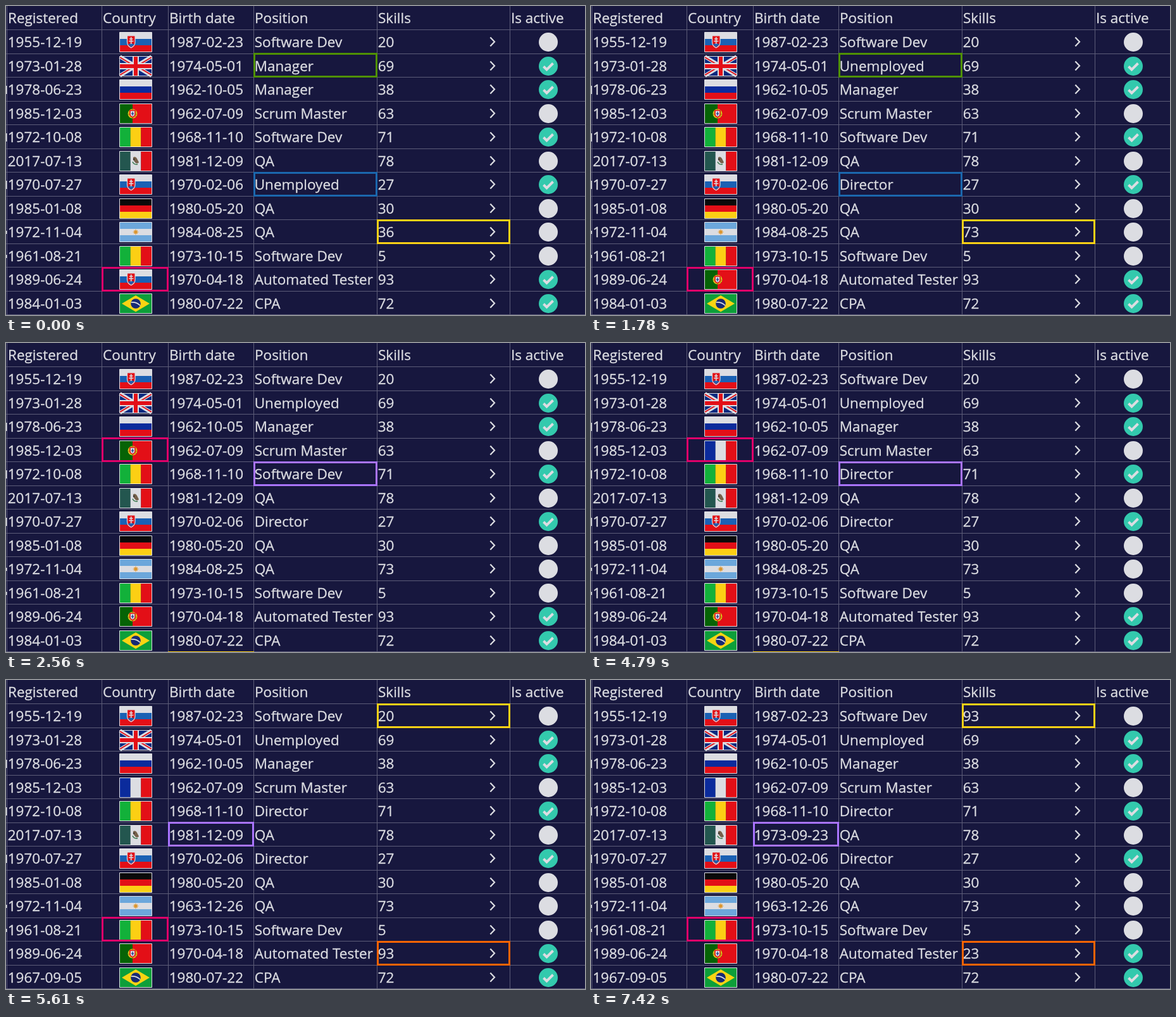
Write an HTML page that moves like this. It is 915 px wide and 488 px high and loops after 8000 ms.

```html
<!DOCTYPE html>
<html lang="en">
<head>
<meta charset="utf-8">
<title>Live data grid</title>
<style>
html, body { margin: 0; height: 100%; overflow: hidden; background: #17173e; }
svg { display: block; width: 915px; height: 488px; font: 22.5px "Open Sans", "Noto Sans", sans-serif; }
text { fill: #dcdde2; stroke: #dcdde2; stroke-width: .3px; white-space: pre; }
</style>
</head>
<body>
<svg id="grid" viewBox="0 0 915 488"></svg>
<script>
const LOOP = 8000, ROW = 37.5, LIGHT = '#dcdde2';
const cols = [1, 151, 256, 391, 586, 796, 915];
const heads = ['Registered', 'Country', 'Birth date', 'Position', 'Skills', 'Is active'];
const steps = [0, 610, 2560, 3570, 5610, 6540];

const rows = `1955-12-19|sk|1987-02-23|Software Dev|20|
1973-01-28|gb|1974-05-01|Manager|69|y
1978-06-23|ru|1962-10-05|Manager|38|y
1985-12-03|pt|1962-07-09|Scrum Master|63|
1972-10-08|ml|1968-11-10|Software Dev|71|y
2017-07-13|mx|1981-12-09|QA|78|
1970-07-27|sk|1970-02-06|Unemployed|27|y
1985-01-08|de|1980-05-20|QA|30|
1972-11-04|ar|1984-08-25|QA|36|
1961-08-21|ml|1973-10-15|Software Dev|5|
1989-06-24|sk|1970-04-18|Automated Tester|93|y
1984-01-03|br|1980-07-22|CPA|72|y`.split('\n').map(r => r.split('|'));

// step, row, column, new value
const edits = [
  [1, 2, 3, 'Unemployed'], [1, 7, 3, 'Director'], [1, 9, 4, '73'], [1, 11, 1, 'pt'],
  [3, 4, 1, 'fr'], [3, 5, 3, 'Director'],
  [4, 9, 2, '1963-12-26'], [4, 12, 0, '1967-09-05'],
  [5, 1, 4, '93'], [5, 6, 2, '1973-09-23'], [5, 11, 4, '23']
];

// first step, last step, row, column, colour
const marks = [
  [0, 1, 2, 3, '#4f9100'], [0, 1, 7, 3, '#1b67ad'], [0, 1, 9, 4, '#fcd116'], [0, 1, 11, 1, '#df0069'],
  [2, 3, 4, 1, '#df0069'], [2, 3, 5, 3, '#a974ff'], [2, 3, 13, 2, '#fcd116'],
  [4, 5, 1, 4, '#fcd116'], [4, 5, 6, 2, '#a974ff'], [4, 5, 10, 1, '#df0069'], [4, 5, 11, 4, '#ff6400']
];

const rect = (x, y, w, h, fill) => `<rect x="${x}" y="${y}" width="${w}" height="${h}" fill="${fill}"/>`;
const path = (d, fill, stroke = 'none', w = 1) =>
  `<path d="${d}" fill="${fill}" stroke="${stroke}" stroke-width="${w}"/>`;
const dot = (x, y, r, fill) => `<circle cx="${x}" cy="${y}" r="${r}" fill="${fill}"/>`;
const text = (x, y, s) => `<text x="${x}" y="${y}">${s}</text>`;
const bands = (...c) => c.map((f, i) => rect(1, 1 + i * 10, 50, 10, f)).join('');
const bars = (...c) => c.map((f, i) => rect(1 + i * 50 / 3, 1, 50 / 3 + .1, 30, f)).join('');

const red = '#e30f17', yellow = '#fccf14';
const flags = {
  sk: bands(LIGHT, '#1a61b4', red) +
    path('M12.5 6H25V16Q25 22 18.7 25Q12.5 22 12.5 16Z', red, LIGHT, 1.2) +
    path('M14 20Q16 17 18.7 19Q21.5 17 23.5 20L18.7 24Z', '#1a61b4') +
    path('M18.7 8V19M16 11H21.5M15 14.5H22.5', 'none', LIGHT, 1.6),
  gb: rect(0, 0, 52, 32, '#0b2a80') +
    path('M1 1L51 31M51 1L1 31', 'none', LIGHT, 6) +
    path('M1 2L26 17M26 15L51 30M51 2L26 17M26 15L1 30', 'none', red, 2) +
    path('M26 1V31M1 16H51', 'none', LIGHT, 10) +
    path('M26 1V31M1 16H51', 'none', red, 6),
  ru: bands(LIGHT, '#0b2b9c', red),
  pt: rect(0, 0, 21, 32, '#066306') + rect(21, 0, 31, 32, red) +
    dot(21, 16, 7.5, '#d9bd1c') + path('M15 11L27 21M14 17H28M21 8V24', 'none', '#8c6a10', .8) +
    path('M17 11H25V17Q25 20 21 21.5Q17 20 17 17Z', LIGHT, red, 1.6) +
    path('M21 13V19M19 16H23', 'none', '#24428f', 1.3),
  ml: bars('#12b13a', yellow, red),
  mx: bars('#23564f', LIGHT, red) +
    path('M22 10Q26 8 28 12L31 18Q28 21 25 18L22 14Z', '#75604a') +
    path('M21 17Q23 22 29 21', 'none', '#3d7a50', 1.5) + dot(23, 13, 1.2, '#33302f'),
  de: bands('#0a0a0a', red, yellow),
  ar: bands('#6ca7db', LIGHT, '#6ca7db') +
    path('M21.5 16H30.5M26 11.5V20.5M23 13L29 19M29 13L23 19', 'none', '#e3a13c', 1) +
    dot(26, 16, 2.7, '#dc962f'),
  br: rect(0, 0, 52, 32, '#0d9f3a') + path('M4 16L26 3L48 16L26 29Z', '#f8d413') +
    dot(26, 16, 7.8, '#172a75') + path('M18.6 14Q27 13 33 19', 'none', LIGHT, 1.6),
  fr: bars('#0b2b9c', LIGHT, red)
};

const mid = r => Math.ceil(19.5 + ROW * r);

function flag(id, y) {
  return `<g transform="translate(179 ${y - 16})">${flags[id]}` +
    path('M.5 .5H51.5V31.5H.5Z', 'none', LIGHT) + '</g>';
}

function toggle(on, y) {
  return dot(857, y, 15, on ? '#33c9ad' : LIGHT) +
    (on ? path(`M849.5 ${y + .5}L854.5 ${y + 5.5}L864.5 ${y - 4.5}`, 'none', LIGHT, 4) : '');
}

function picture(step) {
  const data = rows.map(r => r.slice());
  for (const [s, r, c, v] of edits) if (step >= s) data[r - 1][c] = v;

  let out = rect(0, 0, 915, 488, '#17173e');
  for (let r = 1; r <= 13; r++) out += rect(0, Math.floor(ROW * r), 915, 1, '#5c5c78');
  for (const x of cols.slice(0, 6)) out += rect(x, 0, 1, 488, '#5c5c78');
  heads.forEach((h, i) => out += text(cols[i] + 2, 27, h));

  data.forEach((d, i) => {
    const y = mid(i + 1);
    for (const c of [0, 2, 3, 4]) out += text(cols[c] + 1.7, y + 8, d[c]);
    out += flag(d[1], y) + toggle(d[5], y) +
      path(`M765.3 ${y - 7.5}L772 ${y - .5}L765.3 ${y + 6.5}`, 'none', LIGHT, 2.2);
  });

  // edges of the column scrolled off to the left
  for (const r of [3, 5, 7]) out += rect(0, mid(r) - 6, 1.5, 13, LIGHT);
  for (const r of [9, 10]) out += rect(0, mid(r) - 2, 1.5, 5, LIGHT);

  for (const [a, b, r, c, color] of marks) {
    if (step < a || step > b) continue;
    const x = cols[c] + 1.5, y = Math.floor(ROW * r - .5) + 1.5;
    out += path(`M${x} ${y}H${cols[c + 1] - .5}V${y + 36}H${x}Z`, 'none', color, 3);
  }
  return out;
}

const grid = document.getElementById('grid');
let shown = -1;
function draw(now) {
  const t = now % LOOP;
  const step = steps.filter(s => s <= t).length - 1;
  if (step !== shown) grid.innerHTML = picture(shown = step);
  requestAnimationFrame(draw);
}
draw(0);
</script>
</body>
</html>
```
